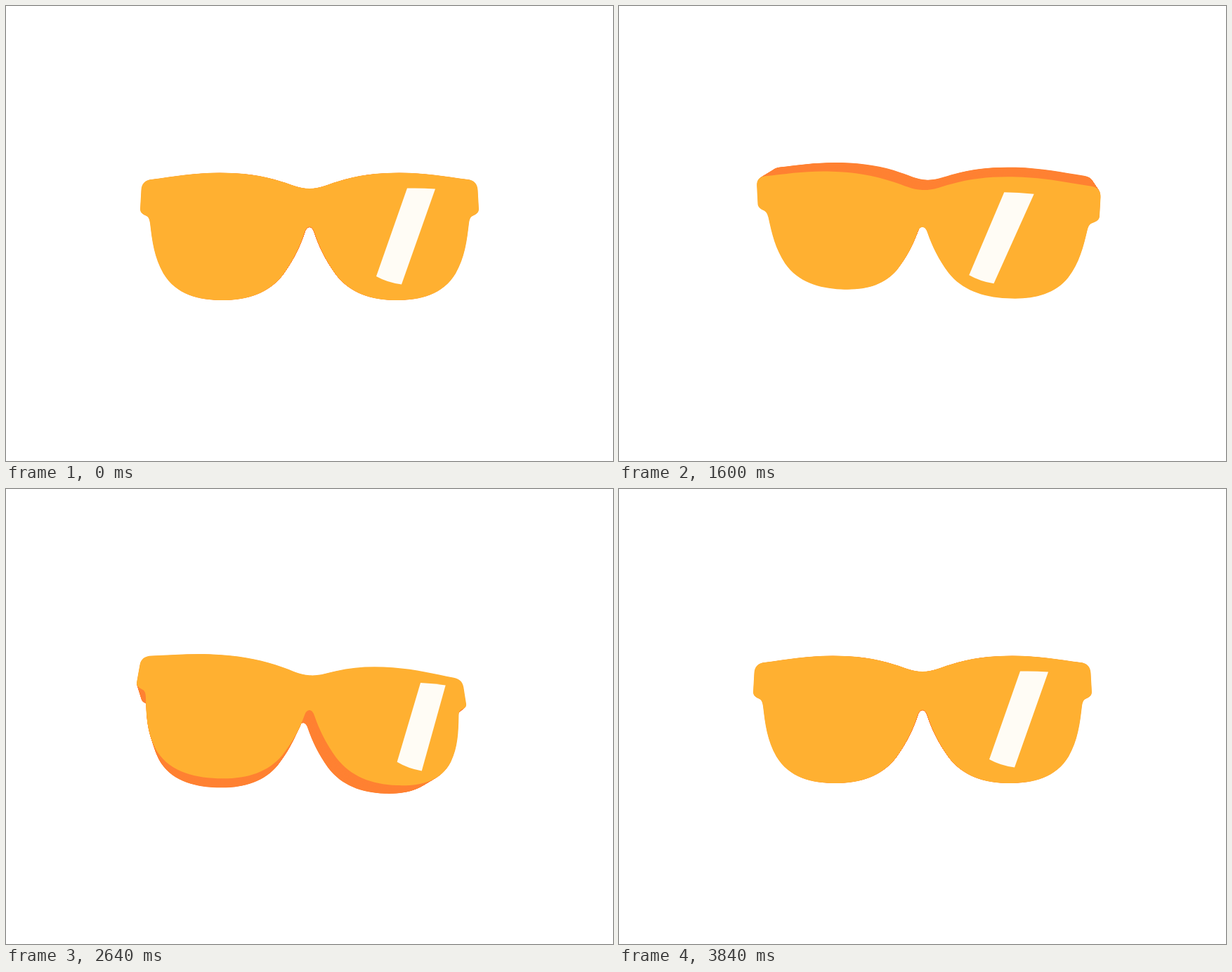
Write an HTML page with a canvas that moves like this. It is 864 by 648 pixels and loops after 3.88 s.

```html
<!DOCTYPE html>
<html lang="en">
<head>
<meta charset="utf-8">
<title>Turning sunglasses</title>
<style>
html, body { margin: 0; width: 864px; height: 648px; overflow: hidden; background: #fff; }
canvas { display: block; }
</style>
</head>
<body>
<canvas id="stage" width="864" height="648"></canvas>
<script>
const ctx = document.getElementById('stage').getContext('2d');
const W = 864, H = 648, LOOP = 3880, STEP = 40;
const FOCAL = 780, DEPTH = 57, LAYERS = 40;

const points = text => {
  const n = text.trim().split(/\s+/).map(Number);
  return Array.from({ length: n.length / 2 }, (_, i) => [n[2 * i], n[2 * i + 1]]);
};

// Right half of the flat frame as cubic segments, from bridge to nose; the left half mirrors it.
const half = points(`432 260
  447 260 458 254 472 250  500 241 528 237.5 560 237.5
  598 237.5 625 243 657 247  666 248 671 253 671.5 262
  672 271 672.5 280 673 289  673 294 670 296 666 298
  661 300 660 303 659 309  656 335 653 358 640 381
  622 411 590 419 556 419  520 419 490 409 470 383
  455 362 446 343 439 322  436 312`);
const frame = [...half, ...half.map(([x, y]) => [W - x, y]).reverse()];

// Highlight on the lens: corners with a bend in the top and bottom edge.
const shine = points('571 259.5 590 259 611 260.5 563 396.5 543 394 527 385');

// Camera view of flat points, set back by depth, after yaw and then pitch.
function project(flat, { pitch, yaw }, depth = 0) {
  const [sp, cp, sy, cy] = [Math.sin(pitch), Math.cos(pitch), Math.sin(yaw), Math.cos(yaw)];
  return flat.map(([px, py]) => {
    const x = px - W / 2, y = py - H / 2;
    const z = x * sy - depth * cy;
    const scale = FOCAL / (FOCAL - z * cp + y * sp);
    return [W / 2 + scale * (x * cy + depth * sy), H / 2 + scale * (y * cp + z * sp)];
  });
}

// Eased progress for a cubic-bezier(x1, 0, x2, 1) curve.
function ease(t, x1, x2) {
  let lo = 0, hi = 1;
  for (let i = 0; i < 30; i++) {
    const s = (lo + hi) / 2, r = 1 - s;
    if (3 * s * r * r * x1 + 3 * s * s * r * x2 + s ** 3 < t) lo = s; else hi = s;
  }
  return lo * lo * (3 - 2 * lo);
}

// Turn goes from rest to 1 (top in view), to -1 (underside in view) and back to rest.
function turnAt(t) {
  if (t < 960) return ease(t / 960, 0.33, 0);
  if (t < 2840) return 1 - 2 * ease((t - 960) / 1880, 0.67, 0.33);
  return ease((t - 2840) / (LOOP - 2840), 0.67, 0.33) - 1;
}

function fillOutline(p, color) {
  ctx.fillStyle = color;
  ctx.beginPath();
  ctx.moveTo(...p[0]);
  for (let i = 1; i < p.length; i += 3) ctx.bezierCurveTo(...p[i], ...p[i + 1], ...p[i + 2]);
  ctx.fill();
}

function fillShine(p, color) {
  ctx.fillStyle = color;
  ctx.beginPath();
  ctx.moveTo(...p[0]);
  ctx.quadraticCurveTo(...p[1], ...p[2]);
  ctx.lineTo(...p[3]);
  ctx.quadraticCurveTo(...p[4], ...p[5]);
  ctx.fill();
}

function draw(t) {
  const q = turnAt(t), deg = Math.PI / 180;
  const view = { pitch: (25 * q + 5 * q * q) * deg, yaw: 10 * q * deg };
  const slide = -36 * q - 4 * q * q;

  ctx.fillStyle = '#fff';
  ctx.fillRect(0, 0, W, H);
  for (let i = LAYERS; i > 0; i--) {
    fillOutline(project(frame, view, DEPTH * i / LAYERS), '#ff8132');
  }
  fillOutline(project(frame, view), '#ffb031');
  fillShine(project(shine.map(([x, y]) => [x + slide, y]), view), '#fffcf5');
}

const begin = performance.now();
function tick() {
  const t = (performance.now() - begin) % LOOP;
  draw(Math.floor(t / STEP) * STEP);
  requestAnimationFrame(tick);
}
tick();
</script>
</body>
</html>
```
